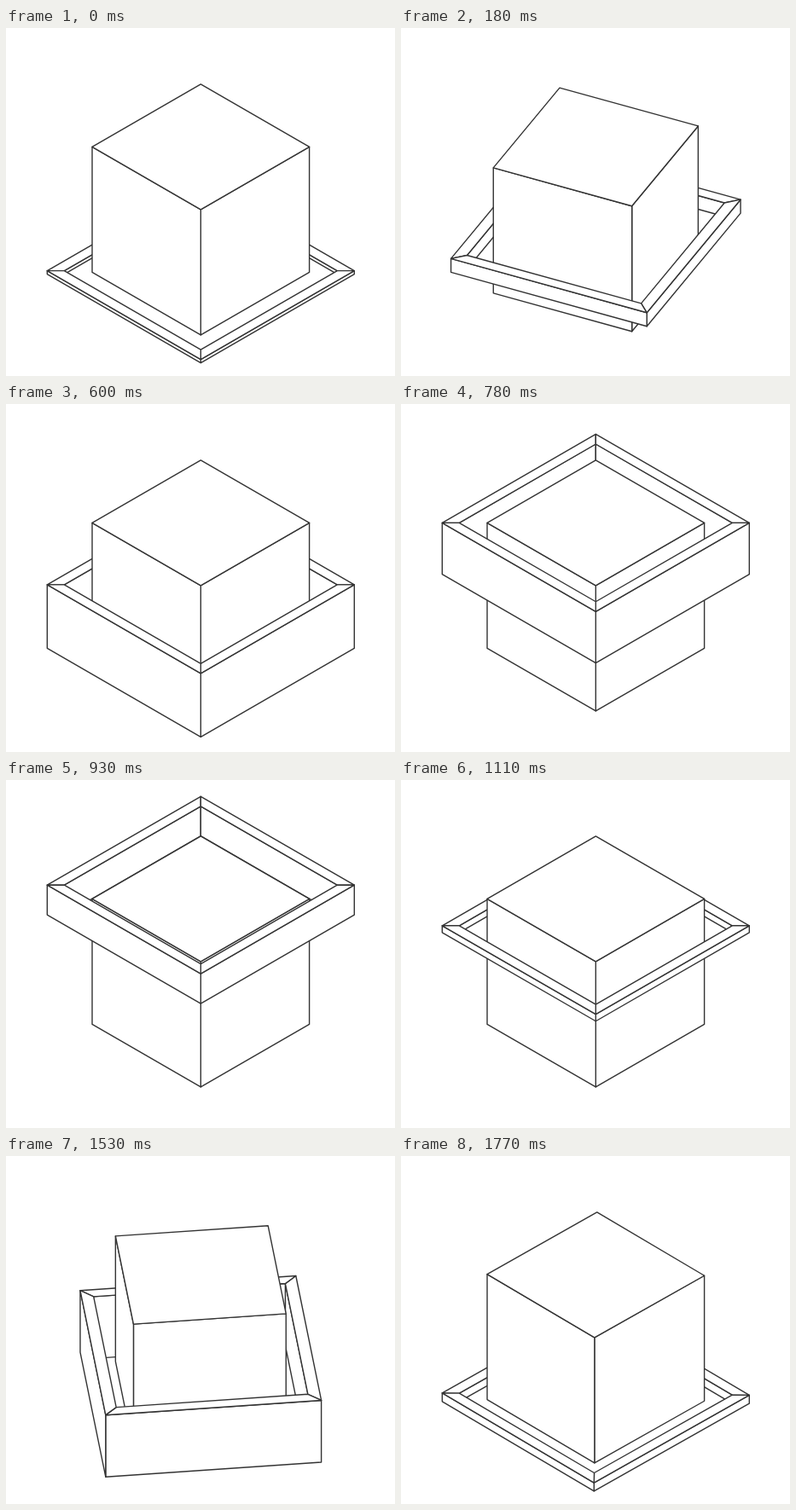
These frames come from a looping animation (456x408 px, 1.8 s). An HTML page with a canvas:

```html
<!DOCTYPE html>
<html lang="en">
<head>
<meta charset="utf-8">
<title>Ring and cube</title>
<style>
html, body { margin: 0; width: 456px; height: 408px; overflow: hidden; background: #fff; }
canvas { display: block; }
</style>
</head>
<body>
<canvas id="stage" width="456" height="408"></canvas>
<script>
const ctx = document.getElementById('stage').getContext('2d');
const LOOP = 1800, PHASE = 600, STEP = 30;
const CX = 228.3, BASE = 286.4, TILT = Math.sqrt(1 / 3);
const CUBE = 127.3, OUTER = 180, INNER = 160, HEIGHT = 147;

const smooth = p => p * p * (3 - 2 * p);
const mix = (a, b, k) => a + (b - a) * k;

// Rim heights above the floor: [from, to, hop, hop power]
const phases = [
  { turn: 1, top: [1.75, 74.5, 41, 1], low: [-2.2, 0, 45, 1] },
  { turn: 0, top: [74.5, 75, 89.5, 1], low: [0, 72, 88, 1] },
  { turn: 1, top: [75, 1.75, 31.8, 1], low: [72, -2.2, -38.5, 2] }
];

function level([from, to, hop, power], p) {
  return mix(from, to, smooth(p)) + hop * Math.sin(Math.PI * p) ** power;
}

function point(r, a, z) {
  return [CX + r * Math.cos(a), BASE - z + r * TILT * Math.sin(a)];
}

function face(...pts) {
  ctx.beginPath();
  pts.forEach(([x, y]) => ctx.lineTo(x, y));
  ctx.closePath();
  ctx.fill();
  ctx.stroke();
}

function wall(r, a, b, low, top) {
  face(point(r, a, top), point(r, b, top), point(r, b, low), point(r, a, low));
}

function rim(a, b, z) {
  face(point(OUTER, a, z), point(OUTER, b, z), point(INNER, b, z), point(INNER, a, z));
}

function draw(t) {
  const phase = phases[Math.floor(t / PHASE)];
  const p = t % PHASE / PHASE;
  const top = level(phase.top, p), low = level(phase.low, p);
  const turn = -phase.turn * smooth(p) * Math.PI / 2;
  const sides = [0, 1, 2, 3].map(i => {
    const a = turn + i * Math.PI / 2;
    return { a, b: a + Math.PI / 2, front: Math.sin(a + Math.PI / 4) > 0 };
  });
  const near = sides.filter(s => s.front), far = sides.filter(s => !s.front);

  ctx.fillStyle = '#fff';
  ctx.fillRect(0, 0, 456, 408);
  ctx.strokeStyle = '#333';
  ctx.lineWidth = 1.4;
  ctx.lineJoin = 'round';

  far.forEach(s => wall(INNER, s.a, s.b, low, top));
  far.forEach(s => rim(s.a, s.b, top));
  near.forEach(s => wall(CUBE, s.a, s.b, 0, HEIGHT));
  face(...sides.map(s => point(CUBE, s.a, HEIGHT)));
  near.forEach(s => wall(OUTER, s.a, s.b, low, top));
  near.forEach(s => rim(s.a, s.b, top));
}

const start = performance.now();
function tick() {
  const t = (performance.now() - start) % LOOP;
  draw(Math.floor(t / STEP) * STEP);
  requestAnimationFrame(tick);
}
tick();
</script>
</body>
</html>
```
